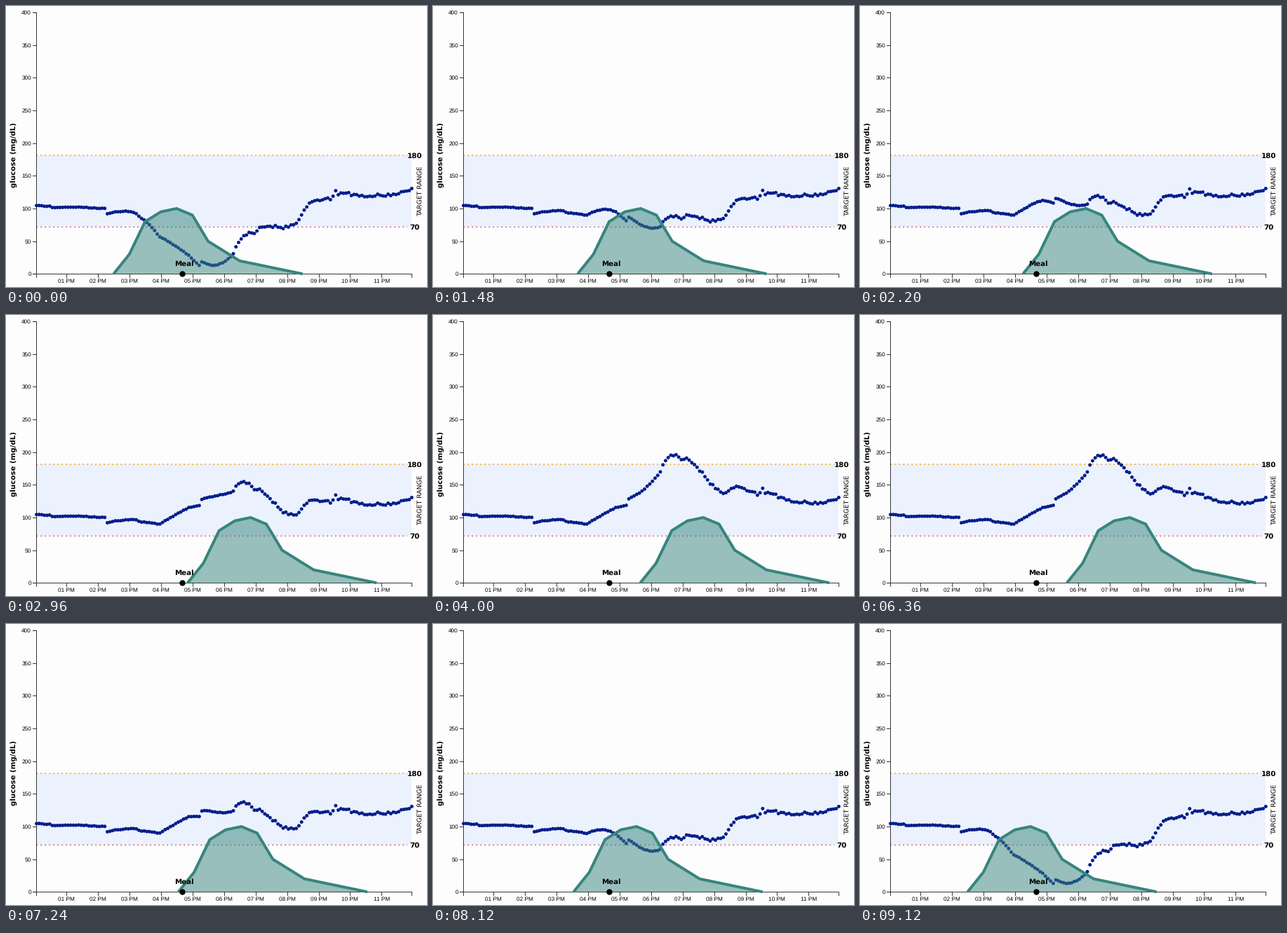
Recreate the animation shown at these times as a matplotlib script. Size 600 px wide and 401 px high, loop 9.2 s.

```python
import numpy as np
import matplotlib.pyplot as plt
from matplotlib.animation import FuncAnimation
from matplotlib.patches import Polygon, Rectangle

plt.rcParams["text.hinting"] = "none"

W, H = 600, 401
STEP, FRAMES = 40, 230
LEFT, RIGHT, TOP, BASE = 43.2, 578.3, 9.2, 382.3
HOUR = 44.9              # pixels per hour
ONE_PM = 86.3
DOSE_X = 153.3           # dose start at zero offset
DROP, LAG = 161, 0.23    # total glucose drop (mg/dL), delay (hours)
COUNT, SPLIT = 144, 76   # readings, first reading of the late part
TEAL = "#37857d"

# Dose activity: hours after start, strength
HOURS, POWER = np.array([
    (0, 0), (0.5, 30), (1, 80), (1.5, 95), (2, 100),
    (2.5, 90), (3, 50), (4, 20), (6, 0)]).T

# Trend key points (reading number, mg/dL): no dose yet, then after an early dose
EARLY = [(0, 104.4), (5, 103.4), (7, 101), (11, 102.4), (22, 101), (26, 100.3),
         (27, 91.5), (30, 95), (37, 97.5), (40, 93.3), (47, 90), (54, 107),
         (58, 114.8), (62, 118.5), (63, 129), (68, 140), (72, 155.5), (75, 172.5)]
LATE = [(76, 39.5), (79, 60), (84, 64), (85, 70.5), (89, 74), (94, 70),
        (100, 81), (102, 98), (105, 111), (112, 115), (113, 117), (114, 129.5),
        (115, 120), (117, 125), (123, 119), (130, 120), (136, 120), (143, 129)]

# Dragging the dose: time in ms, offset in pixels
DRAG_T, DRAG_X = np.array([
    (40, 0), (2960, 105.5), (5040, 172.5), (5440, 180.5),
    (5840, 172.5), (6360, 141.5), (8120, 47), (9120, 0)]).T
DRAG_V = np.gradient(DRAG_X, DRAG_T)


def y_px(value):
    return BASE - np.asarray(value) * (BASE - TOP) / 400


def drag(ms):
    """Cubic Hermite path through the drag points."""
    ms = min(max(ms, DRAG_T[0]), DRAG_T[-1])
    k = min(np.searchsorted(DRAG_T, ms, side="right") - 1, len(DRAG_T) - 2)
    span = DRAG_T[k + 1] - DRAG_T[k]
    s = (ms - DRAG_T[k]) / span
    return ((1 + 2 * s) * (1 - s) ** 2 * DRAG_X[k]
            + s * (1 - s) ** 2 * span * DRAG_V[k]
            + s * s * (3 - 2 * s) * DRAG_X[k + 1]
            + s * s * (s - 1) * span * DRAG_V[k + 1])


fine = np.linspace(0, 6, 601)
power = np.interp(fine, HOURS, POWER)
absorbed = np.concatenate([[0], np.cumsum(power[1:] + power[:-1])])
absorbed /= absorbed[-1]


def drop(x, offset):
    """Glucose removed at x by a dose shifted by offset pixels."""
    hours = (x - DOSE_X - offset) / HOUR - LAG
    return DROP * np.interp(hours, fine, absorbed)


# Glucose without any dose: trend plus sensor noise
number = np.arange(COUNT)
dot_x = np.linspace(LEFT + 0.3, RIGHT, COUNT)
natural = np.where(number < SPLIT, np.interp(number, *zip(*EARLY)),
                   np.interp(number, *zip(*LATE)) + drop(dot_x, 0))
noise = np.random.default_rng(7).uniform(-1, 1, COUNT)
natural += noise * np.where(number < SPLIT, 0.6, 2.2)

fig = plt.figure(figsize=(W / 72, (H + 0.001) / 72), dpi=72, facecolor="#fefdfe")
ax = fig.add_axes([0, 0, 1, 1])
ax.set_xlim(0, W)
ax.set_ylim(H, 0)
ax.axis("off")


def line(xs, ys, color="#222222", width=0.9, z=2, **style):
    return ax.plot(xs, ys, color=color, lw=width, zorder=z, **style)[0]


def label(x, y, text, size, **style):
    style = {"ha": "center", "va": "baseline", "family": "DejaVu Sans", **style}
    ax.text(x, y, text, fontsize=size, zorder=8, color="black", **style)


def tick_label(x, y, text, **style):
    label(x, y, text, 8.2, family="Liberation Sans", **style)


# Target range
HIGH, LOW = 213.1, 315.4
ax.add_patch(Rectangle((LEFT, HIGH), RIGHT - LEFT, LOW - HIGH,
                       fc="#ebf2fd", lw=0, zorder=1))
for y, color, text in ((HIGH, "#f6b443", "180"), (LOW, "#d98088", "70")):
    line([LEFT, 572], [y, y], color, 2, dashes=(1, 2), dash_capstyle="butt", snap=False)
    label(582.2, y + 3.9, text, 10.3, weight="bold")
label(590.6, 264.2, "TARGET RANGE", 9.2, rotation=90, va="center")
label(11.6, 212.6, "glucose (mg/dL)", 10.3, rotation=90, va="center", weight="bold")

# Axes
line([38, LEFT, LEFT, 38], [TOP, TOP, BASE, BASE])
line([LEFT, LEFT, RIGHT, RIGHT], [BASE + 5, BASE, BASE, BASE + 5])
for value in range(0, 401, 50):
    y = float(y_px(value))
    line([38, LEFT], [y, y])
    tick_label(36, y + 2.9, str(value), ha="right")
for hour in range(1, 12):
    x = ONE_PM + (hour - 1) * HOUR
    line([x, x], [BASE, BASE + 5])
    tick_label(x, 395.3, f"{hour:02d} PM")

# Meal marker
ax.scatter([251.4], [382.3], s=8.4 ** 2, c="black", lw=0, zorder=7)
label(253.4, 370.8, "Meal", 10.3, weight="bold")

# Moving parts
dots = ax.scatter(dot_x, y_px(natural), s=np.full(COUNT, 5.0 ** 2),
                  c="#051d8c", lw=0, zorder=3)
area = Polygon([[0, 0]], closed=True, fc=TEAL, alpha=0.51, lw=0, zorder=4)
ax.add_patch(area)
edge = line([], [], TEAL, 4, 5, solid_joinstyle="miter", solid_capstyle="butt")
stage = Rectangle((0, 0), 595, H, transform=ax.transData)
for part in (area, edge):
    part.set_clip_path(stage)


def draw(frame):
    offset = drag(frame * STEP)
    dots.set_offsets(np.column_stack([dot_x, y_px(natural - drop(dot_x, offset))]))
    xs, ys = DOSE_X + offset + HOURS * HOUR, y_px(POWER)
    area.set_xy(np.column_stack([xs, ys]))
    edge.set_data(xs, ys)
    return dots, area, edge


anim = FuncAnimation(fig, draw, frames=FRAMES, interval=STEP, repeat=True,
                     repeat_delay=0, blit=False)
plt.show()
```
